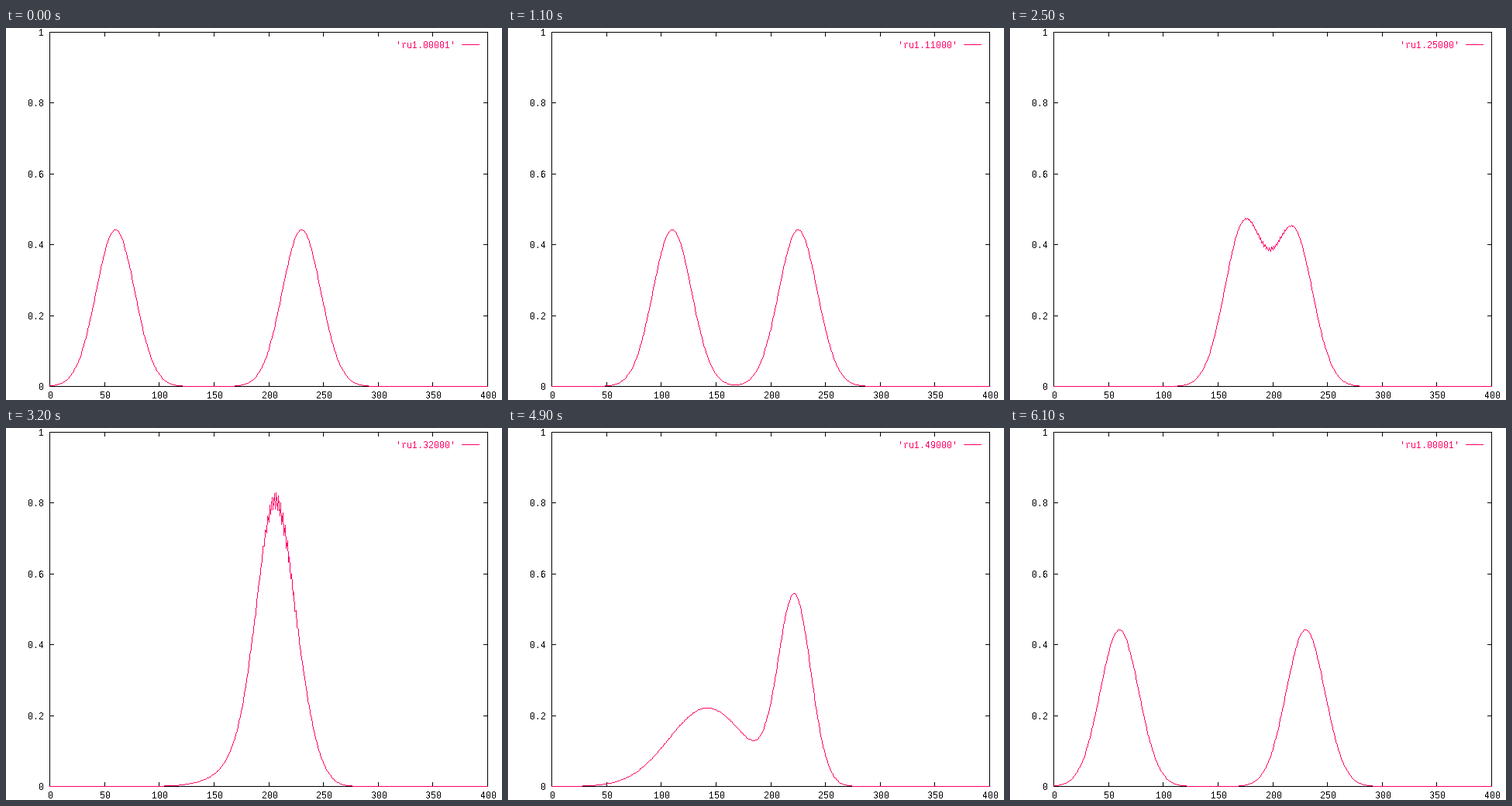
These frames come from a looping animation (640x480 px, 6200 ms). A matplotlib script:

```python
import matplotlib.pyplot as plt
import numpy as np
from matplotlib.animation import FuncAnimation

W, H, DPI = 640, 480, 100
FRAMES, INTERVAL = 62, 100
LEFT, RIGHT, TOP, BOTTOM = 56, 621, 5, 462
CELL = 7                      # text advance in pixels
TICK = 5
PINK = "#ff0066"

plt.rcParams["text.antialiased"] = False
plt.rcParams["font.family"] = "Liberation Mono"
FONT_SIZE = CELL / 0.6 * 72 / DPI

fig = plt.figure(figsize=(W / DPI, H / DPI), dpi=DPI, facecolor="white")
ax = fig.add_axes([0, 0, 1, 1])
ax.set_xlim(0, W)
ax.set_ylim(H, 0)
ax.axis("off")


def pixel_run(xs, ys):
    """Pixels of a polyline as one-pixel dashes separated by gaps."""
    xs, ys = np.asarray(xs, float), np.asarray(ys, float)
    steps = np.maximum(abs(np.diff(xs)), abs(np.diff(ys)))
    at = np.concatenate([[0], np.cumsum(np.maximum(steps, 1))])
    s = np.arange(at[-1] + 1)
    px = np.floor(np.interp(s, at, xs) + 0.5)
    py = np.floor(np.interp(s, at, ys) + 0.5) + 0.5
    gap = np.full_like(px, np.nan)
    return (np.column_stack([px, px + 1, gap]).ravel(),
            np.column_stack([py, py, gap]).ravel())


def stroke(xs, ys, color="black", z=1):
    line, = ax.plot(*pixel_run(xs, ys), color=color, lw=72 / DPI,
                    snap=False, solid_capstyle="butt", zorder=z)
    return line


def label(x, y, text, color="black"):
    """Text starting at x, vertically centred on pixel row y."""
    return ax.text(x, y + 5, text, color=color, fontsize=FONT_SIZE,
                   ha="left", va="baseline")


def to_px(x):
    return np.floor(LEFT + (RIGHT - LEFT) * x / 400 + 0.5)


def to_py(v):
    return np.floor(BOTTOM - (BOTTOM - TOP) * v + 0.5)


# Border, mirrored ticks and tick labels
stroke([LEFT, RIGHT, RIGHT, LEFT, LEFT], [TOP, TOP, BOTTOM, BOTTOM, TOP])
for value in range(0, 401, 50):
    px, text = to_px(value), str(value)
    stroke([px, px], [BOTTOM, BOTTOM - TICK])
    stroke([px, px], [TOP, TOP + TICK])
    label(px - CELL * len(text) // 2 + 1, 473, text)
for i in range(6):
    py, text = to_py(i / 5), f"{i / 5:g}"
    stroke([LEFT, LEFT + TICK], [py, py])
    stroke([RIGHT, RIGHT - TICK], [py, py])
    label(49 - CELL * len(text), py, text)

# Two wave packets with mass ratio 1:10 and opposite momenta
SIGMA = 25 / np.sqrt(2)
PEAK = 0.442
MASS = 10
SPEED = 4.55
CORE = 2.2                    # range of the hard repulsion
RIPPLE = 0.026

x = np.arange(401)
x1, x2 = np.meshgrid(x, x, indexing="ij")
gap = x1 - x2
centre = (x1 + MASS * x2) / (1 + MASS)
mirror = -2 * CORE - gap
m1 = centre + mirror * MASS / (1 + MASS)
m2 = centre - mirror / (1 + MASS)
allowed = np.clip(0.5 - gap - CORE, 0, 1)


def packet(a, b, c1, c2):
    return np.exp(-((a - c1) ** 2 + (b - c2) ** 2) / (2 * SIGMA ** 2))


def density(t):
    """Sum of both one-particle densities, incident plus reflected."""
    c1 = 60 + SPEED * t
    c2 = 230 - SPEED / MASS * t
    joint = allowed * (packet(x1, x2, c1, c2) + packet(m1, m2, c1, c2))
    rho = joint.sum(axis=0) + joint.sum(axis=1)
    rho *= PEAK / (SIGMA * np.sqrt(2 * np.pi))
    # Grid-scale ripple where the packets touch
    return rho - RIPPLE * (-1.0) ** x * packet(x, x, c1, c2)


stroke([588, 610], [21, 21], PINK)
title = label(503, 21, "", PINK)
curve = stroke([LEFT, RIGHT], [BOTTOM, BOTTOM], PINK, z=3)


def update(frame):
    t = frame % (FRAMES - 1)
    title.set_text(f"'ru1.{max(1, t * 1000):05d}'")
    curve.set_data(*pixel_run(to_px(x), to_py(density(t))))
    return curve, title


anim = FuncAnimation(fig, update, frames=FRAMES, interval=INTERVAL,
                     repeat=True, repeat_delay=0, blit=False)
plt.show()
```
